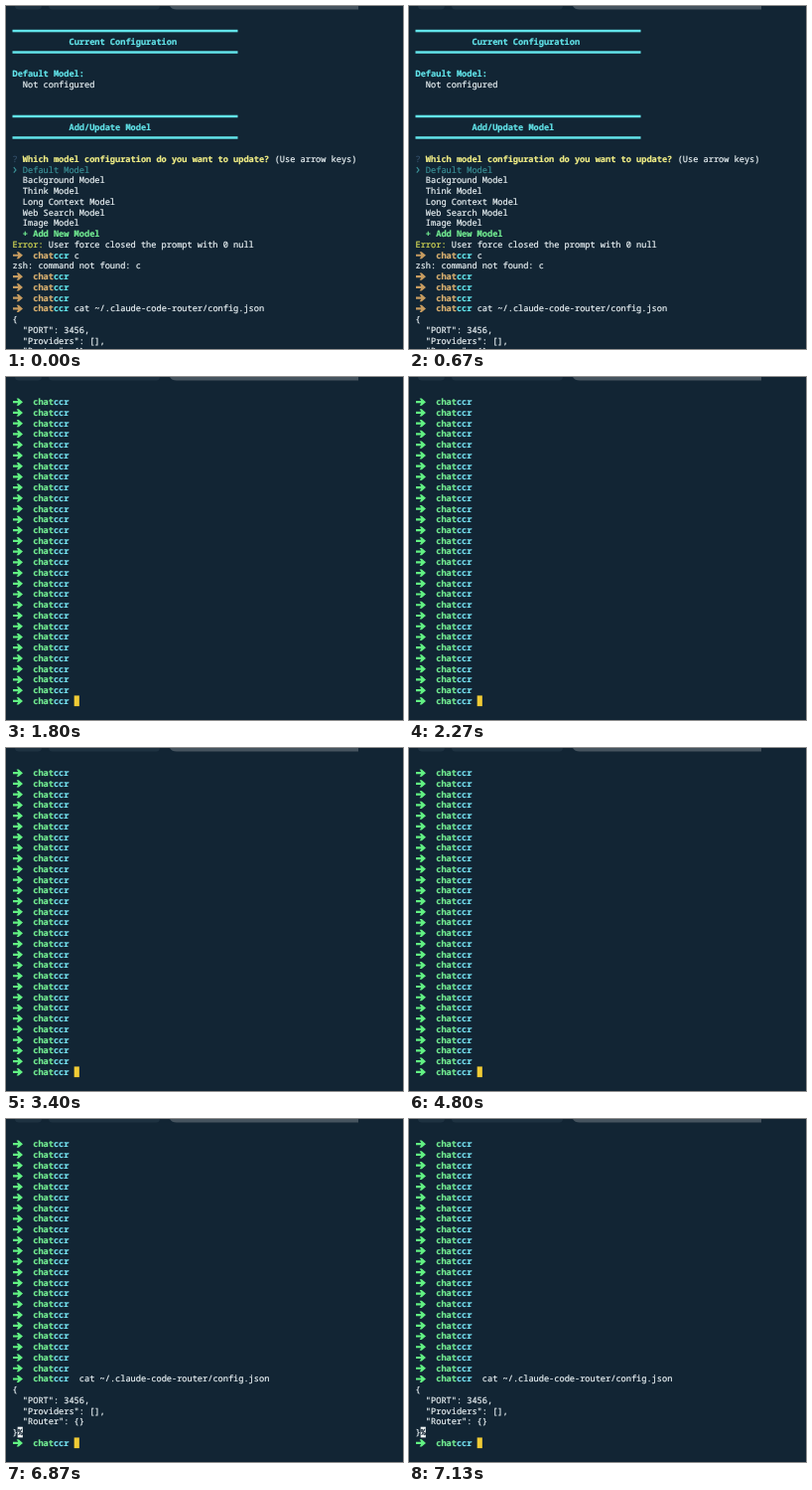
Recreate the animation shown at these times as an HTML page. Size 400x345 px, loop 8000 ms.

```html
<!DOCTYPE html>
<html lang="en">
<head>
<meta charset="utf-8">
<title>Terminal session</title>
<style>
  html, body { margin: 0; width: 100%; height: 100%; overflow: hidden; background: #122534; }
  svg { display: block; width: 400px; height: 345px; }
  text {
    font: 500 8.63px "Noto Sans Mono", "DejaVu Sans Mono", monospace;
    text-rendering: geometricPrecision;
    white-space: pre;
    color: #eaf2f5;
    stroke: currentColor;
    stroke-width: .2px;
  }
  text, rect, path { fill: currentColor; }
  .bold { font-weight: 700; }
  .semi { font-weight: 600; }
  .cyan { color: #62e4ea; }
  .sky { color: #74dfee; }
  .green { color: #62f283; }
  .mint { color: #72ec92; }
  .tan { color: #c79c60; }
  .sand { color: #d8b070; }
  .yellow { color: #f1ee86; }
  .lime { color: #d6da55; }
  .teal { color: #398e94; }
  .dim { color: #34506a; }
  .dark { color: #1a2a38; }
  .cursor { color: #f0cb35; }
  .paper { color: #f4f8fa; }
  .tab { color: #1e3241; }
  .active { color: #46545f; }
  .chevron { fill: none; stroke: currentColor; stroke-width: 1.2px; }

  /* 1670 ms clear, 4870 ms paste, 6870 ms run */
  g { animation: 8s step-end infinite; }
  #menu { animation-name: menu; }
  #prompts { animation-name: prompts; }
  #waiting { animation-name: waiting; }
  #paste { animation-name: paste; }
  #output { animation-name: output; }
  @keyframes menu { 0% { visibility: visible } 20.875%, 100% { visibility: hidden } }
  @keyframes prompts { 0% { visibility: hidden } 20.875%, 100% { visibility: visible } }
  @keyframes waiting { 0% { visibility: hidden } 20.875% { visibility: visible } 85.875%, 100% { visibility: hidden } }
  @keyframes paste { 0% { visibility: hidden } 60.875% { visibility: visible } 85.875%, 100% { visibility: hidden } }
  @keyframes output { 0% { visibility: hidden } 85.875%, 100% { visibility: visible } }
</style>
</head>
<body>
<svg viewBox="0 0 400 345">
  <rect class="tab" x="9" y="-10" width="27" height="13.5" rx="4"/>
  <rect class="tab" x="43" y="-10" width="112" height="13.5" rx="4"/>
  <path class="active" d="M165 0Q167 3.6 172 3.6H355V0Z"/>
  <g id="menu"></g>
  <g id="prompts"></g>
  <g id="waiting"></g>
  <g id="paste"></g>
  <g id="output"></g>
</svg>
<script>
const LEFT = 6.5, COL = 5.18, ROW = 10.74, BASE = 28.1;
const COMMAND = 'cat ~/.claude-code-router/config.json';
const x = col => LEFT + col * COL;
const y = row => BASE + row * ROW;

function add(group, tag, attrs, content = '') {
  const el = document.createElementNS('http://www.w3.org/2000/svg', tag);
  for (const [key, value] of Object.entries(attrs)) el.setAttribute(key, value);
  el.textContent = content;
  document.getElementById(group).append(el);
}

const write = (group, row, col, content, style = '') =>
  add(group, 'text', { x: x(col), y: y(row), class: style }, content);

const block = (group, row, col, cols, style) =>
  add(group, 'rect', { x: x(col), y: y(row) - 8.4, width: cols * COL, height: 10.7, class: style });

function prompt(group, row, styles = ['green', 'mint semi', 'sky semi']) {
  add(group, 'path', {
    d: 'M0-1.1H5.2L3.7-3.6H5.8L10 0 5.8 3.6H3.7L5.2 1.1H0Z',
    transform: `translate(7 ${y(row) - 2.9})`,
    class: styles[0]
  });
  write(group, row, 4, 'chat', styles[1]);
  write(group, row, 8, 'ccr', styles[2]);
}

const rule = row =>
  add('menu', 'rect', { x: LEFT, y: y(row) - 4.3, width: 227, height: 2.5, class: 'cyan' });

function json(group, row) {
  write(group, row, 0, '{');
  ['"PORT": 3456,', '"Providers": [],', '"Router": {}']
    .forEach((line, i) => write(group, row + 1 + i, 2, line));
}

// Configuration menu
[0, 2, 8, 10].forEach(rule);
write('menu', 1, 11, 'Current Configuration', 'cyan semi');
write('menu', 4, 0, 'Default Model:', 'cyan semi');
write('menu', 5, 2, 'Not configured');
write('menu', 9, 11, 'Add/Update Model', 'cyan semi');
write('menu', 12, 0, '?', 'dim');
write('menu', 12, 2, 'Which model configuration do you want to update?', 'yellow semi');
write('menu', 12, 51, '(Use arrow keys)');
add('menu', 'path', { d: `M7.8 ${y(13) - 5.6}l2.2 2.8-2.2 2.8`, class: 'teal chevron' });
write('menu', 13, 2, 'Default Model', 'teal');
['Background', 'Think', 'Long Context', 'Web Search', 'Image']
  .forEach((name, i) => write('menu', 14 + i, 2, name + ' Model'));
write('menu', 19, 2, '+ Add New Model', 'mint bold');
write('menu', 20, 0, 'Error:', 'lime');
write('menu', 20, 7, 'User force closed the prompt with 0 null');
for (const row of [21, 23, 24, 25, 26]) prompt('menu', row, ['tan', 'sand bold', 'cyan bold']);
write('menu', 21, 12, 'c');
write('menu', 22, 0, 'zsh: command not found: c');
write('menu', 26, 12, COMMAND);
json('menu', 27);

// Cleared screen
for (let row = 0; row <= 28; row++)
  prompt(row > 22 && row < 28 ? 'waiting' : 'prompts', row);
block('prompts', 28, 12, 1, 'cursor');

// Pasted command
block('paste', 28, 12, 38, 'paper');
block('paste', 28, 50, 1, 'cursor');
write('paste', 28, 13, COMMAND, 'dark');

// Command result
write('output', 22, 13, COMMAND);
json('output', 23);
write('output', 27, 0, '}');
block('output', 27, 1, 1, 'paper');
write('output', 27, 1, '%', 'dark bold');
</script>
</body>
</html>
```
